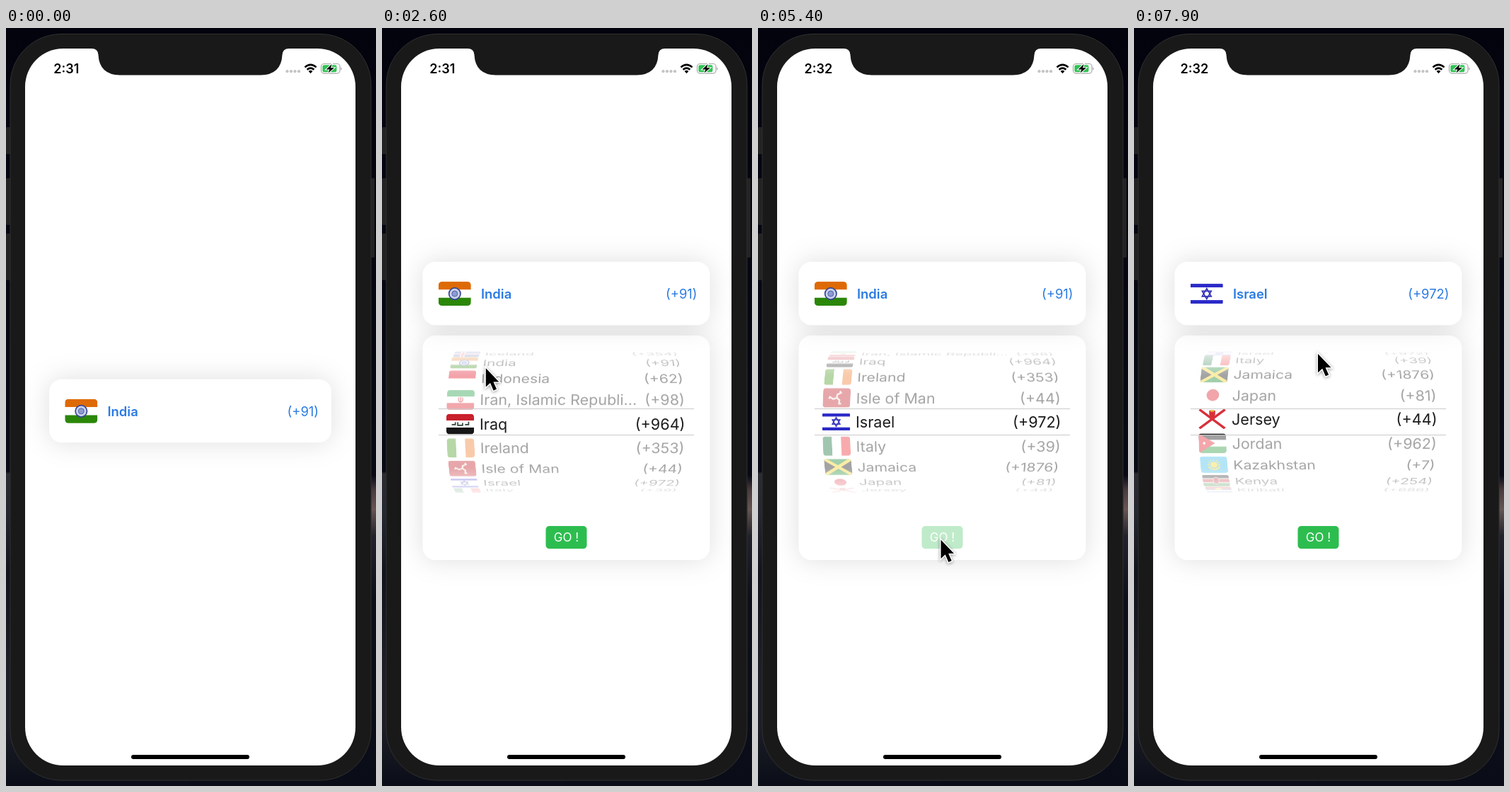
Recreate the animation shown at these times as an HTML page. Size 523 by 1070 pixels, loop 8 s.

```html
<!DOCTYPE html>
<html lang="en">
<head>
<meta charset="utf-8">
<title>Country picker</title>
<style>
html, body { margin: 0; width: 100%; height: 100%; overflow: hidden; background: #05060f; }
svg { display: block; width: 100%; height: 100%; }
text { font-family: Inter, Roboto, sans-serif; }
.card { fill: #fff; filter: drop-shadow(0 0 18px rgba(0, 0, 0, .13)); }
.blue { font-size: 18.4px; fill: #2a7be3; }
.row { font-size: 21.6px; fill: #1c1c1c; }
.end { text-anchor: end; }
.mid { text-anchor: middle; }
</style>
</head>
<body>
<svg id="stage" viewBox="0 0 523 1070" preserveAspectRatio="none"></svg>
<script>
const bar = (x, y, w, h, fill) => `<rect x="${x}" y="${y}" width="${w}" height="${h}" fill="${fill}"/>`;
const dot = (x, y, r, fill) => `<circle cx="${x}" cy="${y}" r="${r}" fill="${fill}"/>`;
const shape = (d, fill, more = '') => `<path d="${d}" fill="${fill}" ${more}/>`;
const line = (d, color, w) => shape(d, 'none', `stroke="${color}" stroke-width="${w}"`);

// Flags live in a 46 x 34 box.
const rows = (...c) => c.map((f, i) => bar(0, i * 34 / c.length, 46, 34 / c.length + .1, f)).join('');
const cols = (...c) => c.map((f, i) => bar(i * 46 / c.length, 0, 46 / c.length + .1, 34, f)).join('');
const spin = (n, part) => Array.from({ length: n }, (_, i) =>
  `<g transform="translate(23 17) rotate(${i * 360 / n})">${part}</g>`).join('');
const saltire = 'M0 0L46 34M46 0L0 34';

const flags = {
  Honduras: rows('#2470c8', '#fff', '#2470c8') + [15, 31, 23].map(x => dot(x, 17, 1.6, '#2470c8')).join(''),
  'Hong Kong': rows('#d8202a') + spin(5, '<ellipse cy="-5.5" rx="2.7" ry="4.6" fill="#fff"/>'),
  Hungary: rows('#d8392f', '#fff', '#3f8c45'),
  Iceland: rows('#1c4aa0') + line('M16 0V34M0 17H46', '#fff', 8) + line('M16 0V34M0 17H46', '#dd2a36', 4),
  India: rows('#de6a05', '#fff', '#2b8708') +
    '<circle cx="23" cy="17" r="8.2" fill="#c9d0ea" stroke="#35458f" stroke-width="1.7"/>' +
    '<circle cx="23" cy="17" r="4" fill="#8d9bd0" stroke="#4e62ae"/>',
  Indonesia: rows('#e3182c', '#fff'),
  'Iran, Islamic Republi...': rows('#239f48', '#fff', '#dc2430') + line('M20 13Q18 20 23 21Q28 20 26 13M23 12V21', '#dc2430', 1.6),
  Iraq: rows('#c9202c', '#fff', '#161616') + line('M9 18h6v-4M19 14v5h8v-4M31 18h6v-5', '#30463a', 2),
  Ireland: cols('#4d9c24', '#fff', '#f07b2c'),
  'Isle of Man': rows('#c4242b') + spin(3, line('M0 0L1 -6L7 -9L5 -12', '#f4e4e0', 2.8)),
  Israel: rows('#fff') + bar(0, 3, 46, 5, '#2a29c8') + bar(0, 26, 46, 5, '#2a29c8') +
    line('M23 9.6L29.4 20.7H16.6ZM23 24.4L16.6 13.3H29.4Z', '#3432b8', 1.7),
  Italy: cols('#14703a', '#fff', '#ee2d34'),
  Jamaica: rows('#16862f') + shape('M0 0L23 17L0 34ZM46 0L23 17L46 34Z', '#191919') + line(saltire, '#f4d224', 6),
  Japan: rows('#fff') + dot(23, 17, 10.5, '#dc1f2e'),
  Jersey: rows('#fff') + line(saltire, '#d8303a', 4) + shape('M18 3h10v6q-1 5-5 6q-4-1-5-6z', '#d8303a') + bar(20, 2, 6, 3, '#e8b92c'),
  Jordan: rows('#161616', '#fff', '#2d9a40') + shape('M0 0L27 17L0 34Z', '#e0242e') + dot(9, 17, 2.2, '#fff'),
  Kazakhstan: rows('#45bfe9') + spin(12, line('M0 -7V-11', '#f6d732', 1.6)) + dot(23, 17, 6, '#f6d732') +
    line('M13 22Q23 32 33 22', '#f6d732', 2),
  Kenya: rows('#161616', '#c6232c', '#2c7d2e') + bar(0, 10, 46, 2, '#fff') + bar(0, 22, 46, 2, '#fff') +
    '<ellipse cx="23" cy="17" rx="5" ry="10" fill="#a81d25" stroke="#fff"/>',
  Kiribati: rows('#d3232e', '#d3232e', '#2751a5', '#fff', '#2751a5') + dot(23, 13, 6, '#f3cb2f')
};
const codes = [504, 852, 36, 354, 91, 62, 98, 964, 353, 44, 972, 39, 1876, 81, 44, 962, 7, 254, 686];
const countries = Object.keys(flags).map((name, i) => ({ name, code: `(+${codes[i]})`, flag: flags[name] }));
const HOME = 4;

const wheelRow = c => `<g class="row">
  <g><g transform="scale(.85) translate(-23 -17)" clip-path="url(#flagClip)">${c.flag}</g></g>
  <text y="8">${c.name}</text><text y="8" class="end">${c.code}</text></g>`;
const wheel = countries.map(wheelRow).join('');

const header = (c, id) => `<g id="${id}">
  <g class="left"><g transform="translate(22.3 28)" clip-path="url(#flagClip)">${c.flag}</g>
  <text class="blue" x="82.5" y="51.7" font-weight="600">${c.name}</text></g>
  <text class="blue end right" y="51.7">${c.code}</text></g>`;

const fade = (id, stops, x2 = 0, y2 = 1) => `<linearGradient id="${id}" x2="${x2}" y2="${y2}">${stops.map(([o, c, a = 1]) =>
  `<stop offset="${o}" stop-color="${c}" stop-opacity="${a}"/>`).join('')}</linearGradient>`;

const statusBar = `
  <text id="clock" class="mid" x="85.3" y="63.6" font-size="18" font-weight="600"></text>
  ${[397.5, 403, 408.5, 414].map(x => dot(x, 61.2, 2.1, '#c4c4c4')).join('')}
  ${line('M422.4 55.4Q430.5 48.2 438.6 55.4M425.6 58.8Q430.5 54.6 435.4 58.8', '#000', 2.6)}
  ${shape('M427.6 61Q430.5 58.6 433.4 61L430.5 64.2Z', '#000')}
  <rect x="445.5" y="50.5" width="26.5" height="13.6" rx="4" fill="#fff" stroke="#a9a9a9" stroke-width="1.2"/>
  <rect x="447.4" y="52.3" width="20" height="10" rx="2.2" fill="#30c353"/>
  ${shape('M473.4 55.2q2.4 2 0 4.4z', '#999')}
  ${shape('M460.6 51L452.6 58.4H457.4L455.4 63.6L464 56.2H459Z', '#000', 'stroke="#fff" stroke-width="2" paint-order="stroke"')}`;

const panel = `<g id="panel">
  <rect id="panelCard" class="card" x="57.5" width="406" rx="18"/>
  <g clip-path="url(#panelClip)"><g id="panelBody">
    <g clip-path="url(#outerBand)"><g id="dim" opacity=".4">${wheel}</g></g>
    <g clip-path="url(#innerBand)"><g id="bright">${wheel}</g></g>
    ${bar(80, 455, 361, 36, 'url(#fadeTop)')}${bar(80, 621, 361, 36, 'url(#fadeBottom)')}
    ${bar(80, 537, 361, 1, '#c9c9c9')}${bar(80, 574, 361, 1, '#c9c9c9')}
    <g id="go"><rect x="231.5" y="703" width="58" height="32" rx="5" fill="#2dbd4f"/>
    <text class="mid" x="260.5" y="725.3" font-size="17" fill="#fff">GO !</text></g>
  </g></g></g>`;

const stage = document.getElementById('stage');
stage.innerHTML = `<defs>
  <clipPath id="flagClip"><rect width="46" height="34" rx="5"/></clipPath>
  <clipPath id="innerBand">${bar(57, 538, 407, 36, '#000')}</clipPath>
  <clipPath id="outerBand">${bar(57, 456, 407, 82, '#000')}${bar(57, 574, 407, 82, '#000')}</clipPath>
  <clipPath id="panelClip"><rect id="panelMask" x="57.5" width="406" rx="18"/></clipPath>
  ${fade('fadeTop', [[0, '#fff', .8], [.35, '#fff', .45], [1, '#fff', 0]])}
  ${fade('fadeBottom', [[0, '#fff', 0], [.65, '#fff', .45], [1, '#fff', .8]])}
  ${fade('leftSky', [[0, '#03030d'], [.3, '#050713'], [.585, '#080a15'], [.588, '#2b2b33'], [.64, '#252731'], [.72, '#11131d'], [.84, '#1d1e27'], [.92, '#1d1e27'], [1, '#0a0d17']])}
  ${fade('rightSky', [[0, '#03030d'], [.59, '#080a15'], [.61, '#4a3c3f'], [.635, '#665552'], [.67, '#22222c'], [.75, '#0d101b'], [1, '#0a0d17']])}
</defs>
${bar(0, 0, 262, 1070, 'url(#leftSky)')}${bar(261, 0, 262, 1070, 'url(#rightSky)')}
${[[0, 140, 38], [0, 212, 66], [0, 290, 66], [514, 212, 112]].map(([x, y, h]) =>
  `<rect x="${x}" y="${y}" width="7" height="${h}" rx="1.5" fill="#232323"/>`).join('')}
<rect x="6" y="8.5" width="510" height="1053.5" rx="72" fill="#191919" stroke="#303030"/>
<rect x="27" y="29" width="467" height="1012" rx="54" fill="#fff"/>
${shape('M121 28V29Q130 29 130.500 38Q132 66 161 66.500H360Q389 66 390.500 38Q391 29 400 29V28Z', '#191919')}
${statusBar}
<rect x="177" y="1026" width="167" height="6" rx="3" fill="#000"/>
${panel}
<g id="top"><rect id="topCard" class="card" height="89.5" rx="18"/>
${header(countries[HOME], 'before')}${header(countries[HOME + 6], 'after')}</g>
<path id="cursor" d="M0 0V26.500L6.200 20.700L10.800 31.500L15.200 29.600L10.600 19.200H18.500Z" fill="#000" stroke="#fff"
  stroke-width="3" paint-order="stroke" style="filter:drop-shadow(0 1.500px 2px rgba(0,0,0,.4))"/>`;

const $ = id => document.getElementById(id);
const set = (el, attrs) => { for (const k in attrs) el.setAttribute(k, attrs[k]); };

const smooth = u => u * u * (3 - 2 * u);
// Each key is [time, ...values]; values ease between keys.
function track(t, keys) {
  const next = keys.findIndex(k => k[0] > t);
  if (next === 0) return keys[0].slice(1);
  if (next < 0) return keys[keys.length - 1].slice(1);
  const a = keys[next - 1], b = keys[next];
  const u = smooth((t - a[0]) / (b[0] - a[0]));
  return a.slice(1).map((v, i) => v + (b[i + 1] - v) * u);
}

const pointerPath = [
  [0, 250, 1090], [800, 170, 548], [1100, 170, 548], [1800, 134.5, 529.5], [2050, 146, 582],
  [3100, 147.5, 392], [3400, 147.5, 392], [4200, 141.500, 518], [4500, 141.500, 518],
  [5200, 258.500, 722.5], [5500, 258.500, 722.5], [6400, 241.500, 556.5], [6700, 241.500, 556.5],
  [7200, 259, 603], [7900, 260, 460]];
const openPath = [[1000, 0], [1400, 1], [5500, 1], [5900, 0], [6700, 0], [7100, 1]];
const wheelPath = [[2050, 0], [3100, 5.44], [3500, 6], [7200, 6], [7900, 10.12]];

const RADIUS = 106.7, STEP = 18.7 * Math.PI / 180, DEPTH = 1130;
const CENTER_X = 260.5, CENTER_Y = 556;

function placeRow(row, angle) {
  const visible = Math.abs(angle) < 1.5;
  row.style.display = visible ? '' : 'none';
  if (!visible) return;
  const sin = Math.sin(angle), cos = Math.cos(angle);
  const scale = DEPTH / (DEPTH + RADIUS * (1 - cos));
  const y = CENTER_Y + scale * RADIUS * sin;
  const [flag, name, code] = row.children;
  const place = (el, x, middle) => {
    const shear = -middle * scale * scale * sin / DEPTH;
    set(el, { transform: `matrix(${scale} 0 ${shear} ${scale * cos} ${CENTER_X + scale * x} ${y})` });
  };
  place(flag, -150, -150);
  place(name, -122.5, -80);
  place(code, 168, 140);
}

function placeHeader(el, left, right) {
  set(el.querySelector('.left'), { transform: `translate(${left} 0)` });
  set(el.querySelector('.right'), { x: right - 18 });
}

function render(t) {
  const [open] = track(t, openPath), [pos] = track(t, wheelPath), [x, y] = track(t, pointerPath);
  const top = 540.6 - (89.5 + 331.5 * open) / 2;
  const left = 61 - 3.5 * open, right = 460 + 3.5 * open;
  set($('top'), { transform: `translate(0 ${top})` });
  set($('topCard'), { x: left, width: right - left });
  const chosen = t >= 5500;
  $('before').style.display = chosen ? 'none' : '';
  $('after').style.display = chosen ? '' : 'none';
  placeHeader($(chosen ? 'after' : 'before'), left, right);

  const panelTop = top + 89.5 + 14.5 * open;
  const box = { y: panelTop, height: 317 * open };
  $('panel').style.display = open ? '' : 'none';
  set($('panel'), { opacity: open });
  set($('panelCard'), box);
  set($('panelMask'), box);
  set($('panelBody'), { transform: `translate(0 ${panelTop - 434})` });
  for (const layer of ['dim', 'bright'])
    [...$(layer).children].forEach((row, i) => placeRow(row, (i - HOME - pos) * STEP));
  set($('go'), { opacity: t >= 5300 && t < 5600 ? .3 : 1 });

  $('clock').textContent = t < 3700 ? '2:31' : '2:32';
  set($('cursor'), { transform: `translate(${x} ${y})` });
}

function tick(now) {
  render(Math.floor(now % 8000 / 100) * 100);
  requestAnimationFrame(tick);
}
render(0);
requestAnimationFrame(tick);
</script>
</body>
</html>
```
